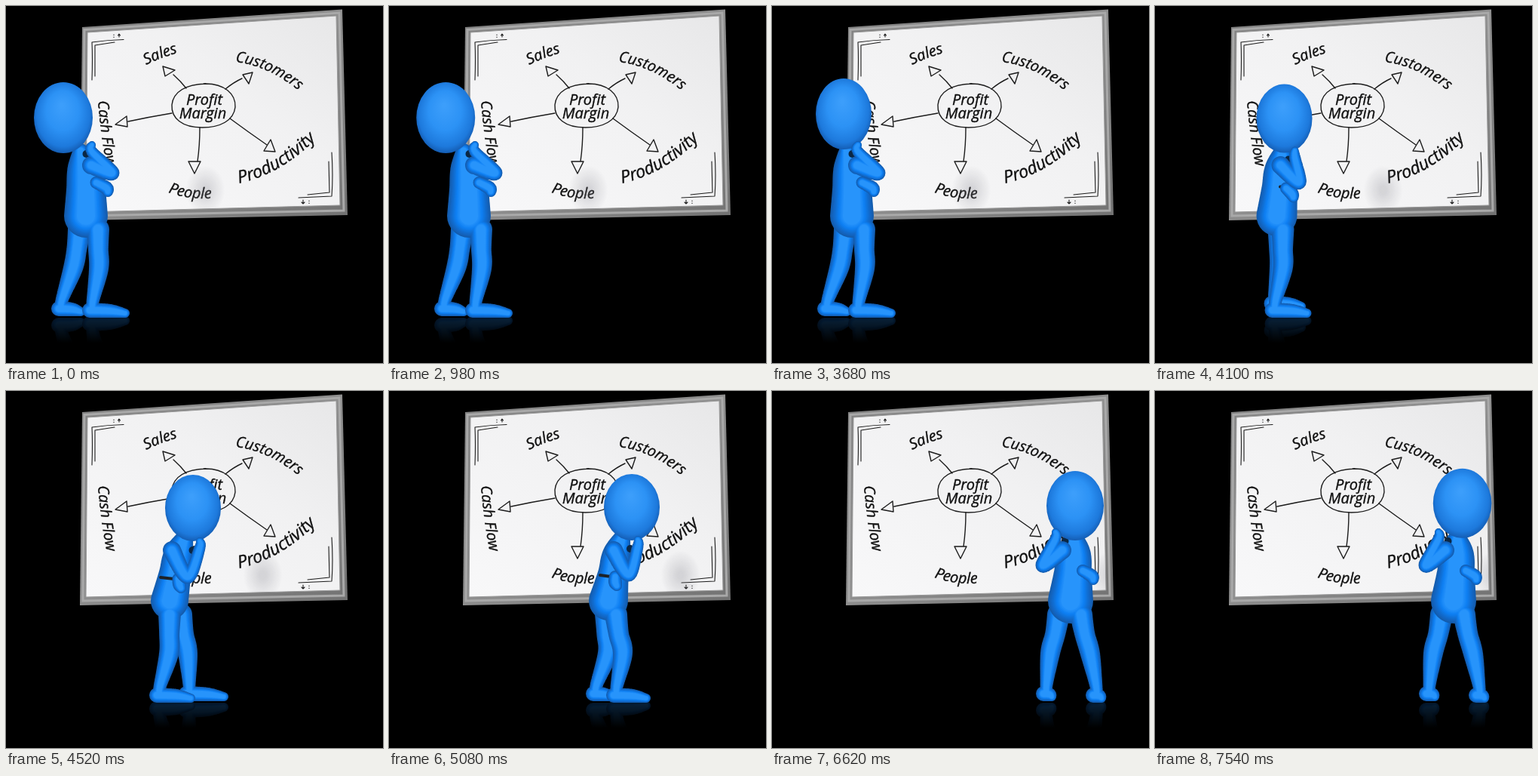
These frames come from a looping animation (500x473 px, 8 s). An HTML page with a canvas:

```html
<!DOCTYPE html>
<html lang="en">
<head>
<meta charset="utf-8">
<title>Profit Margin</title>
<style>
html, body { margin: 0; width: 100%; height: 100%; overflow: hidden; background: #000; }
svg, canvas { position: absolute; left: 0; top: 0; }
text { font: italic 20px "Open Sans", "Noto Sans", sans-serif; fill: #111; stroke: #111; stroke-width: .35; }
.ink { fill: none; stroke: #1c1c1c; stroke-width: 1.4; stroke-linejoin: round; stroke-linecap: round; }
</style>
</head>
<body>
<svg width="500" height="473" viewBox="0 0 500 473">
  <defs>
    <linearGradient id="metal" x1="0" y1="0" x2="1" y2="1">
      <stop offset="0" stop-color="#808080"/><stop offset=".5" stop-color="#8e8e8e"/><stop offset="1" stop-color="#727272"/>
    </linearGradient>
    <linearGradient id="paper" x1="0" y1="1" x2="1" y2="0">
      <stop offset="0" stop-color="#f8f8f9"/><stop offset=".6" stop-color="#f1f1f2"/><stop offset="1" stop-color="#e7e7e8"/>
    </linearGradient>
    <path id="sales" d="M186 78Q205 68 232 61"/>
    <path id="customers" d="M304 74Q352 80 394 117"/>
    <path id="cash" d="M122 126Q125 170 136 226"/>
    <path id="people" d="M215 247Q245 258 282 254"/>
    <path id="productivity" d="M309 235Q370 222 422 165"/>
  </defs>
  <path d="M101 28L446 4.500L453 277L98 284Z" fill="url(#metal)"/>
  <path d="M104 31.500L442 9L448 271L102 278Z" fill="none" stroke="#a9a9a9" stroke-width="3"/>
  <path d="M108 35L438 13L443 264L106 273Z" fill="url(#paper)" stroke="#999"/>
  <g class="ink">
    <path stroke-width="1.100" d="M114 98Q115 70 114 48Q135 45 156 44.500M118 93V52L144 48M143 38v.5M143 41v.5M150 41V37l-1.500 2M150 37l1.500 2"/>
    <path stroke-width="1.100" d="M432 194Q434 225 432 252L388 254M428 206L429 247L400 250M394 257v5l-2 -2M394 262l2 -2M402 258v.5M402 261v.5"/>
    <path d="M262 103C290 102 305 117 304 134C302 152 284 161 260 161C234 161 219 149 220 131C222 113 239 104 265 103"/>
    <path d="M239 109Q232 100 222 91M208 80L224 85L211 93Z"/>
    <path d="M291 110Q302 101 313 96M314 91L327 88L322 103Z"/>
    <path d="M220 142Q190 147 162 153M145 157L160 146L161 160Z"/>
    <path d="M257 161Q257 185 254 206M242 206H258L250 222Z"/>
    <path d="M297 149Q320 166 346 184M342 192L351 177L357 193Z"/>
  </g>
  <text x="263" y="131" text-anchor="middle">Profit</text>
  <text x="261" y="149" text-anchor="middle">Margin</text>
  <text><textPath href="#sales">Sales</textPath></text>
  <text><textPath href="#customers">Customers</textPath></text>
  <text><textPath href="#cash">Cash Flow</textPath></text>
  <text><textPath href="#people">People</textPath></text>
  <text style="font-size:23px"><textPath href="#productivity">Productivity</textPath></text>
</svg>
<canvas id="stage" width="500" height="473"></canvas>
<script>
const ctx = document.getElementById('stage').getContext('2d');
const LOOP = 8000, STEP = 140;
const HOLDS = { 9: 1000, 13: 1000, 35: 500 };

// leg: hip, knee, ankle, toe (x only); arm: shoulder x, elbow, hand
const facingBoard = { neck: [99], chest: [106, 28], hip: [106, 29], near: [122, 123, 115, 158], far: [97, 89, 74, 99], arm: [113, 141, 221, 114, 187], fist: [133, 243, -6] };
const midStride = { neck: [238], chest: [227, 23], hip: [217, 25], near: [217, 216, 204, 245], far: [232, 241, 243, 289], arm: [220, 241, 246, 257, 202], fist: [230, 258, -25] };
const striding = { neck: [310], chest: [300, 22], hip: [291, 26], near: [301, 310, 302, 341], far: [288, 290, 275, 294], arm: [298, 318, 243, 330, 200], fist: [300, 255, -20] };
const arriving = { neck: [390], chest: [391, 28], hip: [392, 28], near: [404, 402, 397, 432], far: [378, 373, 366, 373], arm: [374, 372, 232, 383, 203], fist: [426, 246, -4] };
const lookingBack = { neck: [401], chest: [400, 27], hip: [396, 30], near: [410, 422, 430, 437], far: [380, 369, 364, 371], arm: [385, 359, 231, 376, 190], fist: [424, 247, -4] };

const BODY = [[0, facingBoard], [14, facingBoard], [20, midStride], [24, striding], [30, arriving], [35, lookingBack], [40, lookingBack]];
// step, then x, y, width radius, height radius
const HEAD = [[0, [76, 148, 39, 47]], [9, [75, 148, 39, 47]], [10, [82, 145, 39, 48]], [13, [95, 143, 37, 47]], [14, [95, 143, 37, 47]],
  [20, [248, 155, 37, 44]], [24, [322, 154, 37, 44]], [30, [392, 160, 36, 45]], [35, [402, 152, 38, 46]], [40, [409, 148, 39, 46]]];

const mix = (a, b, u) => a + (b - a) * u;
const mixAll = (a, b, u) => a.map((v, i) => mix(v, b[i], u));

function stepAt(ms) {
  let step = 0, left = ms;
  while (step < 39 && left >= (HOLDS[step] || STEP)) left -= HOLDS[step] || STEP, step++;
  return step;
}

function locate(keys, step) {
  let i = 0;
  while (i < keys.length - 2 && step >= keys[i + 1][0]) i++;
  const [start, from] = keys[i], [end, to] = keys[i + 1];
  return { i, from, to, u: (step - start) / (end - start) };
}

function poseAt(step) {
  const { i, from, to, u } = locate(BODY, step);
  const pose = {};
  for (const part in from) pose[part] = mixAll(from[part], to[part], u);
  const lift = i > 0 && i < 5 ? 7 * Math.sin(Math.PI * u) : 0;
  pose.lift = i % 2 ? [0, lift] : [lift, 0];
  const head = locate(HEAD, step);
  pose.head = mixAll(head.from, head.to, head.u);
  return pose;
}

// Catmull-Rom curve through [x, y, radius] points
function smooth(points) {
  const at = i => points[Math.max(0, Math.min(points.length - 1, i))];
  const curve = [];
  for (let i = 0; i < points.length - 1; i++) {
    const [p, a, b, n] = [at(i - 1), at(i), at(i + 1), at(i + 2)];
    const count = Math.ceil(Math.hypot(b[0] - a[0], b[1] - a[1]) / 1.5) + 1;
    for (let k = 0; k <= count; k++) {
      const u = k / count;
      curve.push(a.map((v, j) => v + 0.5 * u * (b[j] - p[j]
        + u * (2 * p[j] - 5 * v + 4 * b[j] - n[j] + u * (3 * (v - b[j]) + n[j] - p[j])))));
    }
  }
  return curve;
}

// Joined tubes, shaded from dark rim to bright core
function tubes(...lines) {
  const discs = lines.flatMap(smooth);
  for (let pass = 0; pass < 10; pass++) {
    const size = 1 - pass * 0.065;
    ctx.beginPath();
    for (const [x, y, r] of discs) {
      ctx.moveTo(x + r * size, y);
      ctx.arc(x, y, r * size, 0, 7);
    }
    ctx.fillStyle = `hsl(${212 - pass * 0.3} ${80 + pass * 1.8}% ${38 + pass * 2.1}%)`;
    ctx.fill();
  }
}

function leg([hip, knee, ankle, toe], lift, depth) {
  const y = -lift - depth;
  return [
    [[hip, 296, 15], [mix(hip, knee, 0.4), 322, 13.5], [knee, 348 + y / 2, 13], [ankle, 392 + y, 8.5], [ankle, 402 + y, 9]],
    [[ankle - 4, 403 + y, 10], [mix(ankle, toe, 0.55), 404 + y, 9], [toe, 407 + y, 6]]
  ];
}

function drawHead([x, y, rx, ry]) {
  ctx.save();
  ctx.translate(x, y);
  ctx.scale(rx, ry);
  const shade = ctx.createRadialGradient(-0.05, -0.35, 0.05, 0, -0.05, 1.06);
  shade.addColorStop(0, '#3c9efb');
  shade.addColorStop(0.5, '#2c92f5');
  shade.addColorStop(0.85, '#1d79dc');
  shade.addColorStop(1, '#145cb2');
  ctx.fillStyle = shade;
  ctx.beginPath();
  ctx.arc(0, 0, 1, 0, 7);
  ctx.fill();
  ctx.restore();
}

function drawFigure({ neck: [neck], chest: [chest, girth], hip: [hip, hipSize], near, far, arm, fist, lift, head }) {
  const [shoulder, elbowX, elbowY, handX, handY] = arm;
  const [fistX, fistY, penX] = fist;
  const torso = [[neck, 192, 10], [mix(neck, chest, 0.85), 217, girth * 0.84], [mix(chest, hip, 0.3), 243, girth * 0.93], [hip, 278, hipSize]];
  tubes(...leg(far, lift[1], 2));
  tubes(torso, ...leg(near, lift[0], 0));
  ctx.fillStyle = '#0b2744';
  ctx.beginPath();
  ctx.arc((neck + handX) / 2, handY + 9, 5, 0, 7);
  ctx.fill();
  drawHead(head);
  ctx.strokeStyle = '#1d2228';
  ctx.lineWidth = 4;
  ctx.lineCap = 'round';
  ctx.beginPath();
  ctx.moveTo(fistX + penX, fistY - 11);
  ctx.lineTo(fistX + 2, fistY - 8);
  ctx.stroke();
  tubes([[mix(fistX, chest, 0.5), fistY - 9, 8], [fistX, fistY - 2, 9], [fistX + 2, fistY + 3, 7]]);
  tubes([[shoulder, 211, 12], [elbowX, elbowY, 9.5], [handX, handY + 6, 7.5], [handX, handY - 3, 5]]);
}

function drawBoardShadow(x) {
  ctx.save();
  ctx.beginPath();
  [[108, 35], [438, 13], [443, 264], [106, 273]].forEach(point => ctx.lineTo(...point));
  ctx.clip();
  ctx.translate(x, 244);
  ctx.scale(1, 1.25);
  const blur = ctx.createRadialGradient(0, 0, 4, 0, 0, 26);
  blur.addColorStop(0, 'rgba(120,120,130,.25)');
  blur.addColorStop(1, 'rgba(120,120,130,0)');
  ctx.fillStyle = blur;
  ctx.fillRect(-30, -30, 60, 60);
  ctx.restore();
}

function drawReflection(pose) {
  ctx.save();
  ctx.beginPath();
  ctx.rect(0, 411, 500, 62);
  ctx.clip();
  ctx.translate(0, 824);
  ctx.scale(1, -1);
  drawFigure(pose);
  ctx.restore();
  const fade = ctx.createLinearGradient(0, 411, 0, 446);
  fade.addColorStop(0, 'rgba(0,0,0,.76)');
  fade.addColorStop(1, '#000');
  ctx.fillStyle = fade;
  ctx.fillRect(0, 411, 500, 62);
}

function frame() {
  const pose = poseAt(stepAt(performance.now() % LOOP));
  ctx.clearRect(0, 0, 500, 473);
  drawBoardShadow(265 + (pose.chest[0] - 107) * 0.63);
  drawReflection(pose);
  drawFigure(pose);
  requestAnimationFrame(frame);
}
frame();
</script>
</body>
</html>
```
